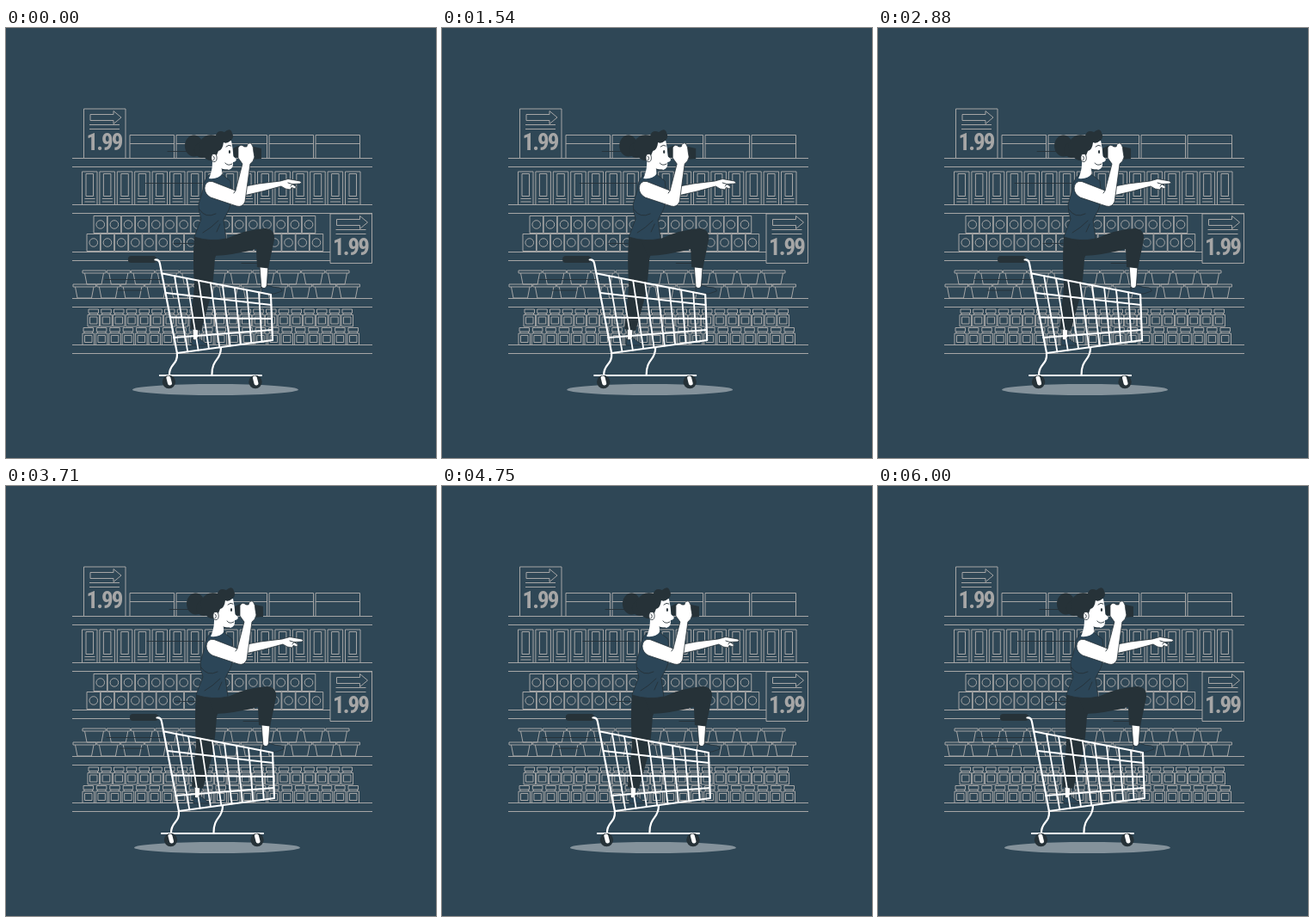
Write an HTML page that moves like this. It is 500 px wide and 500 px high and loops after 6.04 s.

```html
<!DOCTYPE html>
<html lang="en">
<head>
<meta charset="utf-8">
<title>Supermarket cart</title>
<style>
html, body { margin: 0; width: 100%; height: 100%; overflow: hidden; background: #2f4756; }
svg { display: block; width: 100vw; height: 100vh; }
text {
  font: 600 27px "Liberation Sans Narrow", "Roboto Condensed", "Open Sans Condensed", Roboto, sans-serif;
  font-stretch: extra-condensed; letter-spacing: -2px; text-anchor: middle; fill: #a6a6a6;
}
.line { fill: none; stroke: #a6a6a6; stroke-width: 1; }
.dark { fill: #263238; }
.ink { fill: none; stroke: #263238; stroke-width: .9; stroke-linecap: round; }
.skin { fill: #fff; stroke: #263238; stroke-width: .8; stroke-linejoin: round; }
.cloth { fill: #2c4658; stroke: #263238; stroke-width: .8; }
.wire { fill: none; stroke: #fff; stroke-width: 1.8; stroke-linecap: round; stroke-linejoin: round; }
</style>
</head>
<body>
<svg viewBox="0 0 500 500">
  <defs>
    <g id="sign">
      <path class="line" style="fill:#2f4756" d="M90.5 94H139V151.5H90.5Z"/>
      <path class="line" d="M98 100.500H125V96.500L134 104L125 111.500V107.500H98ZM97 112.500H132M97 117.500H132"/>
      <text x="114" y="142">1.99</text>
    </g>
    <g id="wheel">
      <circle class="dark" r="7.700"/>
      <path class="wire" style="stroke-width:5" d="M-.5 -4.500L1 1.500"/>
    </g>
  </defs>
  <path id="shelves" class="line"/>
  <use href="#sign"/>
  <use href="#sign" x="286.500" y="122"/>

  <g id="rider">
    <ellipse cx="243.500" cy="420.500" rx="96.500" ry="6.500" fill="#84929b"/>
    <path class="ink" d="M188 143.500H210M162 180.500H228M195 250.500H218M274 273.500H295M115 292.500H185M130 305H158"/>

    <!-- standing leg -->
    <path class="skin" d="M217 346L217.500 362L220 365L223 362L224 346Z"/>
    <path class="cloth" d="M216 361Q220 365 223 360L235 369H216Z"/>
    <path class="dark" d="M219 243H252L243 268Q241 300 237 316L227 352L214 350Q217 322 219 300Q217 268 219 243Z"/>
    <!-- raised leg -->
    <path class="skin" d="M295 276L297 303H303L305 276Z"/>
    <path class="cloth" d="M297 301Q301 305 304 299Q311 302 318 302Q322 304 321 306L312 309H297Z"/>
    <path class="dark" d="M232 243L256 245Q280 234 302 233Q313 234 312 246L305 279.500L292 278L291 257Q265 264 241 265Z"/>

    <!-- pointing arm -->
    <path class="skin" d="M273 185L294 181L319 178L328 175.500L342 178Q345 180 342 181L333 181.500L338 185Q336 188 332 185.500L331 188Q325 188 320 184L298 190L272 196Z"/>
    <path class="ink" d="M328 180L333 181.500L331 184"/>

    <!-- torso -->
    <path class="cloth" d="M236 171Q229 178 229 188L224 205Q224 214 227 222L219 243Q238 249 256 245L253 223Q260 212 263 200L261 178L251 170Z"/>
    <path class="ink" d="M229 238Q238 233 247 224M225 211Q232 222 244 216M245 237L249 228"/>

    <!-- head -->
    <path class="skin" style="stroke:none" d="M240 147L250 133L262 131Q264 140 264.500 149L268 153Q267 156 264 156Q265 163 259 165L251 164V170Q247 176 236 175Q240 166 240 157Z"/>
    <ellipse class="dark" cx="218.500" cy="137" rx="10.500" ry="12.500"/>
    <circle class="dark" cx="228" cy="142" r="9"/>
    <path class="dark" d="M226 132Q231 122 244 125Q246 118 254 121Q261 115 263 122Q266 128 261 131Q257 135 253 133Q252 142 247 143L243 153Q235 157 229 148Q222 140 226 132Z"/>
    <ellipse class="skin" cx="242" cy="151" rx="3.200" ry="4.600"/>
    <path class="ink" d="M241 149Q244 151 241 154M256 138Q259 135 262 137M255 157Q258 161 263 158M251 164Q254 166 258 165"/>
    <ellipse class="dark" cx="260" cy="144" rx="1.100" ry="2.100"/>

    <!-- binoculars and raised arm -->
    <path class="dark" d="M264 140L270 137L288 138L297 140V152L286 153L265 150Z"/>
    <path class="skin" d="M231 186Q232 177 240 178.500L267 189L275 158L270 151L270 139Q273 134 277 138L280 138Q281 133 285 134Q288 138 288 144L289 150Q288 155 284 158L278 202Q275 209 268 207L238 197Q231 193 231 186Z"/>
    <path class="ink" d="M267 189L265 192"/>

    <!-- cart -->
    <rect class="dark" x="142" y="265" width="33" height="8" rx="3.500"/>
    <path class="wire" id="basket"/>
    <path class="wire" style="stroke-width:2.200" d="M173.500 269.500Q178 269 179 274L199 378L310 363L308 310L182 285.500M199 378C200 392 190 390 190 403M250 372C250 387 239.500 384 239.500 403M179 404H297"/>
    <use href="#wheel" x="189.500" y="411.500"/>
    <use href="#wheel" x="290" y="411.500"/>
  </g>
</svg>
<script>
const $ = id => document.getElementById(id);
const box = (x, y, w, h) => `M${x} ${y}h${w}v${h}h${-w}Z`;
const ring = (x, y, r) => `M${x - r} ${y}a${r} ${r} 0 1 0 ${2 * r} 0a${r} ${r} 0 1 0 ${-2 * r} 0`;
const row = (count, start, pitch, draw) =>
  Array.from({ length: count }, (_, i) => draw(start + i * pitch)).join('');

const crate = x => box(x, 124.5, 51.5, 27) + `M${x} 134.500h51.500`;
const pack = x => box(x, 167, 17.5, 38.5) + box(x + 4.5, 169.5, 8.5, 26) + `M${x + 3} 198.500h12m-12 3.500h12`;
const can = y => x => box(x, y, 15.5, 20) + ring(x + 7.75, y + 10, 4.8);
const cup = (y, w) => x => box(x, y, w, 3) + `M${x + 2.5} ${y + 3}l2.500 13h${w - 10}l2.500 -13`;
const jar = y => x => box(x + 1, y, 11.5, 4.5) + `M${x + 2} ${y + 4.5}v2m9.500 0v-2` +
  box(x, y + 6.5, 13.5, 13.5) + box(x + 2.5, y + 9, 8.5, 8);

$('shelves').setAttribute('d',
  [151.5, 205.5, 260.5, 314.5, 368.5].map(y => `M77 ${y}H426M77 ${y + 10}H426`).join('') +
  row(5, 144, 54, crate) +
  row(16, 88.5, 20.4, pack) +
  row(16, 102, 16.15, can(218.5)) + row(17, 94, 16.2, can(239.5)) +
  row(11, 89, 28.3, cup(282, 27)) + row(12, 78, 27.9, cup(298, 26.5)) +
  row(21, 95, 14.75, jar(327)) + row(21, 89, 15.4, jar(348.5)));

// Vertical wires lean from the top rail to the shorter bottom rail.
const bars = row(8, 1 / 9, 1 / 9, k =>
  `M${182 + 126 * k} ${285.5 + 24.5 * k}L${199 + 111 * k} ${378 - 15 * k}`);
$('basket').setAttribute('d', bars + 'M186 308L308.500 322M191 336.500L309 338M195 360L309.500 351');

// Horizontal shake: one value per tenth of the cycle.
const shake = [0, -1, 2, -4, 4, -4, 4, -4, 2, -1, 0];
const LOOP = 6040, CYCLE = 6000, LEAD = 40;
const start = performance.now();
function frame() {
  const t = (performance.now() - start) % LOOP;
  const p = (t + LEAD) % CYCLE / CYCLE * 10;
  const i = Math.floor(p);
  const x = shake[i] + (shake[i + 1] - shake[i]) * (p - i);
  $('rider').setAttribute('transform', `translate(${x} 0)`);
  requestAnimationFrame(frame);
}
frame();
</script>
</body>
</html>
```
